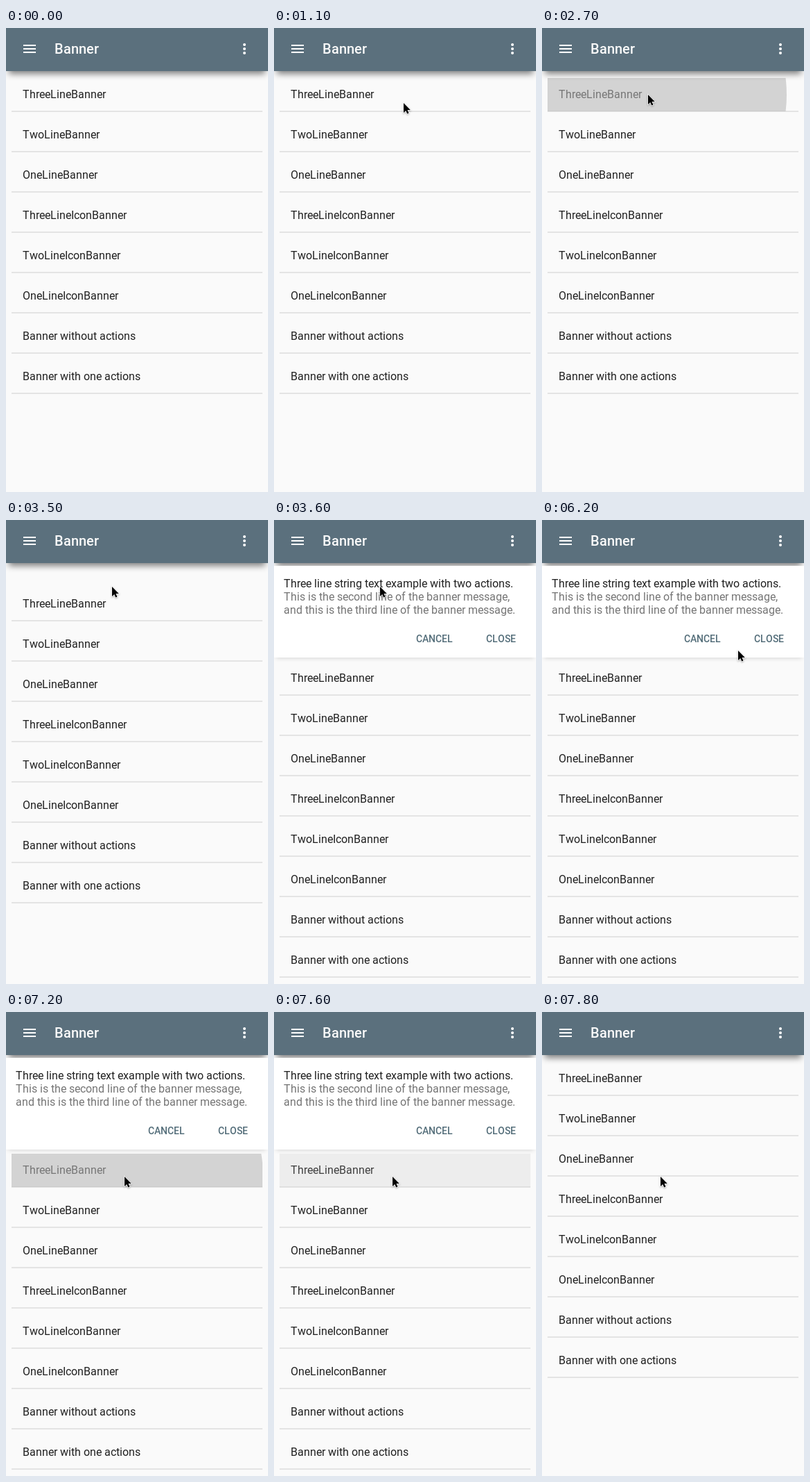
These frames come from a looping animation (378 by 668 pixels, 8 s). An HTML page:

```html
<!DOCTYPE html>
<html lang="en">
<head>
<meta charset="utf-8">
<title>Banner list</title>
<style>
  html, body { margin: 0; width: 100%; height: 100%; overflow: hidden; background: #fafafa; }
  svg { display: block; width: 378px; height: 668px; }
  text { font: 400 16px Roboto, sans-serif; font-kerning: none; fill: #212121; }
  .title { font-size: 20px; font-weight: 500; fill: #fafafa; }
  .muted { fill: #757575; }
  .button { font-size: 14px; font-weight: 500; fill: #546e7a; }
  #cursor path { stroke: #fff; stroke-width: 1.4px; paint-order: stroke; filter: drop-shadow(0 1px 1px rgba(0, 0, 0, .3)); }
</style>
</head>
<body>
<svg viewBox="0 0 378 668">
  <defs>
    <clipPath id="row"><rect x="8" y="72" width="362" height="48"/></clipPath>
  </defs>
  <rect width="378" height="668" fill="#fafafa"/>
  <g id="list">
    <g id="rows"></g>
    <g clip-path="url(#row)"><circle id="ripple" fill="#b8b8b8"/></g>
  </g>
  <rect x="4" y="20" width="370" height="46" opacity=".5" style="filter: blur(5px)"/>
  <rect width="378" height="62" fill="#5b707d"/>
  <g fill="#fff">
    <path d="M25 24h18v2H25zM25 29h18v2H25zM25 34h18v2H25z"/>
    <circle cx="344" cy="24" r="2"/>
    <circle cx="344" cy="30" r="2"/>
    <circle cx="344" cy="36" r="2"/>
  </g>
  <text class="title" x="70" y="37">Banner</text>
  <g id="banner">
    <rect x="3" y="150" width="372" height="49" opacity=".15" style="filter: blur(3px)"/>
    <rect y="66" width="378" height="132" fill="#fff"/>
    <text x="14" y="97">Three line string text example with two actions.</text>
    <text class="muted" x="14" y="116">This is the second line of the banner message,</text>
    <text class="muted" x="14" y="135">and this is the third line of the banner message.</text>
    <text class="button" x="205" y="176">CANCEL</text>
    <text class="button" x="306" y="176">CLOSE</text>
  </g>
  <g id="cursor"><path d="M0 0V14L3.2 11L5.2 15.6L7.5 14.6L5.5 10.1H9.8Z"/></g>
</svg>
<script>
const LOOP = 8000, TICK = 100;
const $ = id => document.getElementById(id);
const ramp = (t, from, to) => Math.min(1, Math.max(0, (t - from) / (to - from)));

const labels = ['ThreeLineBanner', 'TwoLineBanner', 'OneLineBanner', 'ThreeLineIconBanner',
  'TwoLineIconBanner', 'OneLineIconBanner', 'Banner without actions', 'Banner with one actions'];
$('rows').innerHTML = labels.map((label, i) => `
  <text x="24" y="${101 + i * 58}">${label}</text>
  <rect x="8" y="${119 + i * 58}" width="362" height="2" fill="#e4e4e4"/>`).join('');

// Place every glyph on a whole pixel, as hinted text does.
const pen = document.createElement('canvas').getContext('2d');
for (const el of document.querySelectorAll('text')) {
  const { fontWeight, fontSize, fontFamily } = getComputedStyle(el);
  pen.font = `${fontWeight} ${fontSize} ${fontFamily}`;
  let x = Number(el.getAttribute('x'));
  const stops = [...el.textContent].map(char => {
    const at = x;
    x += Math.round(pen.measureText(char).width);
    return at;
  });
  el.setAttribute('x', stops.join(' '));
}

const moves = [
  { from: 300, to: 400, x: 325, y: 284 },
  { from: 600, to: 1100, x: 187, y: 108 },
  { from: 1900, to: 2100, x: 153, y: 96 },
  { from: 4000, to: 4600, x: 320, y: 171 },
  { from: 6100, to: 6600, x: 171, y: 237 }
];
const presses = [
  { down: 2700, up: 3000, x: 153, y: 96 },
  { down: 7200, up: 7600, x: 171, y: 105 }
];

// Quick start, then a soft landing with a slight overshoot.
const glide = u => u + 1.6 * u * u * (1 - u);

function cursorAt(t) {
  let x = 333, y = 292;
  for (const move of moves) {
    const k = glide(ramp(t, move.from, move.to));
    x += (move.x - x) * k;
    y += (move.y - y) * k;
  }
  return [x, y];
}

function rippleAt(t) {
  const press = presses.find(p => t >= p.down && t < p.up + 300);
  if (!press) return { cx: 0, cy: 0, r: 0, opacity: 0 };
  const { down, up, x, y } = press;
  const opacity = t === down ? .57 : t < up ? .27 : .2 - .1 * (t - up) / TICK;
  return { cx: x, cy: y, r: 200 * (1 + ramp(t, down, down + TICK)), opacity: Math.max(0, opacity) };
}

function draw(now) {
  const t = Math.floor(now % LOOP / TICK) * TICK;
  const open = ramp(t, 3400, 3600) - ramp(t, 7600, 7800);
  $('list').setAttribute('transform', `translate(0 ${Math.round(132 * open ** 2.4)})`);
  $('banner').setAttribute('visibility', open === 1 ? 'visible' : 'hidden');
  $('cursor').setAttribute('visibility', t >= 300 ? 'visible' : 'hidden');
  $('cursor').setAttribute('transform', `translate(${cursorAt(t).map(Math.round).join(' ')})`);
  for (const [name, value] of Object.entries(rippleAt(t))) $('ripple').setAttribute(name, value);
}

const start = performance.now();
(function loop() {
  draw(performance.now() - start);
  requestAnimationFrame(loop);
})();
</script>
</body>
</html>
```
